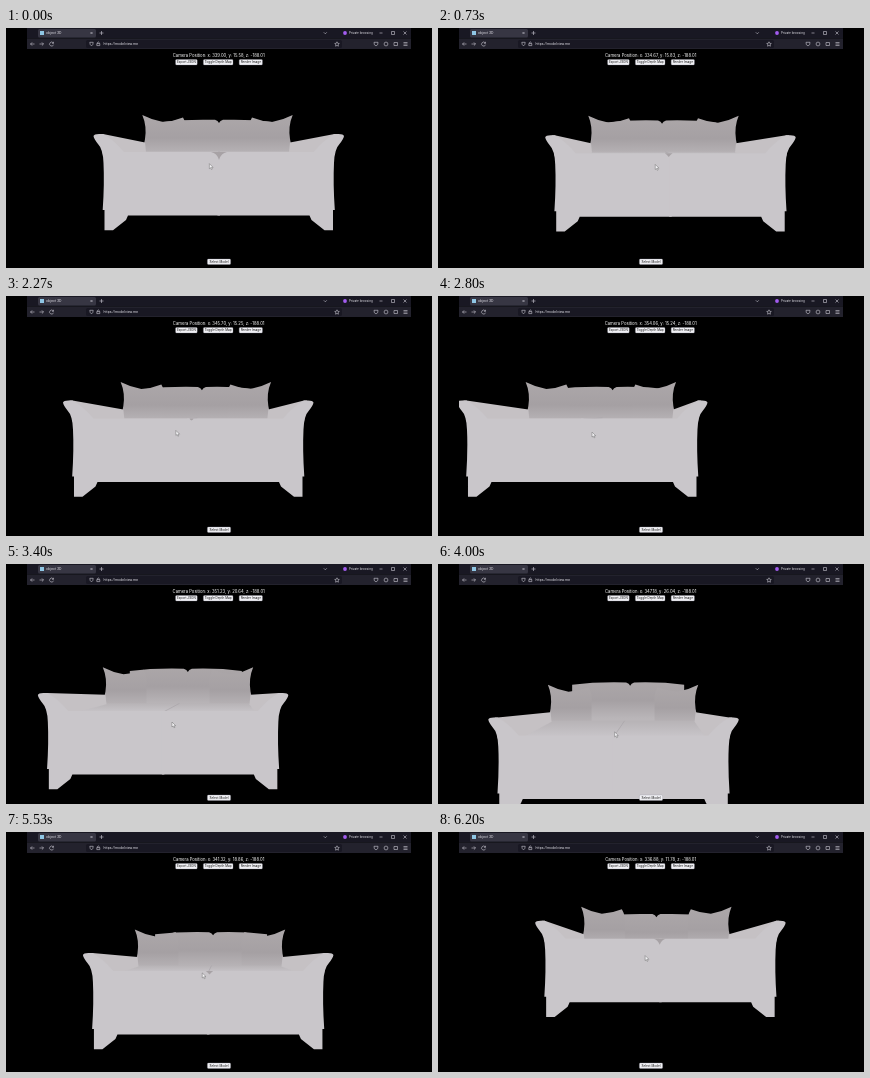
Recreate the animation shown at these times as an HTML page. Size 426 by 240 pixels, loop 6.27 s.

```html
<!DOCTYPE html>
<html lang="en">
<head>
<meta charset="utf-8">
<title>Sofa viewer</title>
<style>
  html, body { margin: 0; width: 100%; height: 100%; overflow: hidden; background: #000; }
  svg { display: block; width: 100%; height: 100%; }
  text { font-family: Inter, Roboto, sans-serif; }
  .icon { fill: none; stroke: #c9c8d2; stroke-width: .6; }
  .ui { fill: #e4e3ea; font-size: 3.4px; }
  .button rect { fill: #f0f0f4; stroke: #8f8f9d; stroke-width: .3; }
  .button text { fill: #111; font-size: 3.1px; text-anchor: middle; }
</style>
</head>
<body>
<svg viewBox="0 0 426 240">
  <defs>
    <clipPath id="page"><rect x="21" y="21" width="384" height="219"/></clipPath>
    <linearGradient id="cloth" gradientUnits="userSpaceOnUse" x1="0" y1="88" x2="0" y2="128">
      <stop offset="0" stop-color="#aca7a9"/>
      <stop offset=".55" stop-color="#a5a0a3"/>
      <stop offset="1" stop-color="#bab6b9"/>
    </linearGradient>
    <linearGradient id="seatTone" x1="0" y1="0" x2="0" y2="1">
      <stop offset="0" stop-color="#b7b3b6"/>
      <stop offset="1" stop-color="#c9c6ca"/>
    </linearGradient>
    <path id="pillow" d="M136.300 87Q146 92 157 94Q167 93.500 177 89.500Q181 96 180 106V127H139Q137 119 139 111Q141 98 136.300 87Z"/>
    <path id="half" d="M87.500 108Q88 106 93 106H97Q108 112 118 124H214V187.500H122L120 192L107 202.300H98.500V182H96.700Q98.500 155 97.500 135Q97 121 92 116Q88 111 87.500 108Z"/>
  </defs>
  <rect width="426" height="240"/>

  <g clip-path="url(#page)">
    <g id="rear">
      <path fill="url(#cloth)" d="M155 140V94Q180 91 209 91.800Q212 92.500 213 95Q214 92.500 217 91.800Q244 91 267 94V140Z"/>
      <path d="M213 95V124" stroke="#98939600" stroke-width=".6"/>
    </g>
    <g id="pillows" fill="url(#cloth)">
      <use href="#pillow"/>
      <use href="#pillow" transform="translate(423) scale(-1 1)"/>
    </g>
    <polygon id="seat" fill="url(#seatTone)"/>
    <polygon id="armL" fill="#c5c1c4"/>
    <polygon id="armR" fill="#c5c1c4"/>
    <path id="seam" stroke="#aaa5a9" stroke-width=".7"/>
    <g id="front" fill="#c9c6ca">
      <use href="#half"/>
      <use href="#half" transform="translate(425.500) scale(-1 1)"/>
      <path id="dip" fill="#a7a2a5"/>
    </g>
    <path id="pointer" d="M0 0V5L1.200 4L2 5.800L2.900 5.400L2.100 3.700H3.700Z" fill="#f4f4f6" stroke="#555" stroke-width=".4"/>
  </g>

  <rect x="21" width="384" height="10.500" fill="#191823"/>
  <rect x="21" y="10.500" width="384" height="10.500" fill="#23222d"/>
  <rect x="32" y="1" width="58" height="8.500" rx="1.500" fill="#373643"/>
  <rect x="34" y="3" width="4" height="4" fill="#8fc6e4"/>
  <text class="ui" x="40" y="6.300">object 3D</text>
  <rect x="80" y="12" width="256" height="8" rx="1.500" fill="#191823"/>
  <text class="ui" x="97.500" y="17.300">https://modelview.me</text>
  <circle cx="339" cy="5" r="1.900" fill="#a35cf0"/>
  <text class="ui" x="343" y="6.200" style="font-size:3px">Private browsing</text>
  <g class="icon">
    <path d="M84.500 4l2 2m0-2l-2 2M93.500 5h4M95.500 3v4M317.800 4.300l1.500 1.500l1.500-1.500"/>
    <path d="M373.500 5h3M385.500 3.500h3v3h-3zM397.500 3.500l3 3m0-3l-3 3"/>
    <path id="arrow" d="M28.500 16h-4l1.600-1.600M24.500 16l1.600 1.600"/>
    <use href="#arrow" transform="translate(62) scale(-1 1)"/>
    <path d="M47.300 15a2 2 0 1 0 .2 1.700M47.500 13.800v1.500h-1.500"/>
    <path d="M83.800 14.300h3.400q0 2.600-1.700 3.600q-1.700-1-1.700-3.600zM90.800 15.600h3v2h-3zM91.400 15.600v-1q.9-1.400 1.800 0v1"/>
    <path d="M331 13.800l.7 1.500l1.600 .2l-1.200 1.100l.3 1.600l-1.400-.8l-1.400 .8l.3-1.600l-1.200-1.100l1.600-.2z"/>
    <path d="M368 14.300h4q.3 3-2 3.600q-2.300-.6-2-3.600M388 14.500h3.500v3h-3.500zM397.500 14.500h4m-4 1.500h4m-4 1.500h4"/>
    <circle cx="380" cy="16" r="1.900"/>
  </g>

  <text id="readout" x="212.700" y="28.700" fill="#fff" font-size="4.190" text-anchor="middle"></text>
  <g id="buttons"></g>
</svg>
<script>
const LOOP = 6270, FPS = 15, END = 6200, SCALE = 4.55;
const FRONT = 1, MIDDLE = .71, REAR = .56;   // parallax by depth
const LEAD = 160;                            // the camera trails the pointer
const $ = id => document.getElementById(id);

// Where the drag turns or changes pace
const DRAG = [
  { t: 0, x: 339, y: 15.58 },
  { t: 1400, x: 331.72, y: 16 },
  { t: 2267, x: 345.71, y: 15.25 },
  { t: 2800, x: 354.06, y: 15.24 },
  { t: 4000, x: 347.18, y: 26.04 },
  { t: 4867, x: 344.43, y: 23.32 },
  { t: END, x: 336.88, y: 11.78 }
];

function buttonRow(labels, y) {
  const gap = 6.2, width = s => 4 + s.length * 1.6;
  let x = 213 - (labels.reduce((sum, s) => sum + width(s) + gap, -gap)) / 2;
  return labels.map(s => {
    const w = width(s), left = x;
    x += w + gap;
    return `<g class="button"><rect x="${left}" y="${y}" width="${w}" height="5.400" rx=".9"/>` +
      `<text x="${left + w / 2}" y="${y + 3.8}">${s}</text></g>`;
  }).join('');
}
$('buttons').innerHTML =
  buttonRow(['Export JSON', 'Toggle Depth Map', 'Render Image'], 31.5) +
  buttonRow(['Select Model'], 231);

const pace = (i, axis) => (DRAG[i + 1][axis] - DRAG[i][axis]) / (DRAG[i + 1].t - DRAG[i].t);

function slope(i, axis) {
  if (i === 0) return pace(0, axis);
  if (i === DRAG.length - 1) return pace(i - 1, axis);
  const a = pace(i - 1, axis), b = pace(i, axis);
  return a * b <= 0 ? 0 : 2 * a * b / (a + b);
}

// Monotone cubic through the drag points
function camera(t, axis) {
  let i = 0;
  while (i < DRAG.length - 2 && t >= DRAG[i + 1].t) i++;
  const a = DRAG[i], b = DRAG[i + 1], h = b.t - a.t;
  const u = Math.min(1, (t - a.t) / h), v = 1 - u;
  return a[axis] * (1 + 2 * u) * v * v + slope(i, axis) * h * u * v * v
    + b[axis] * u * u * (1 + 2 * v) - slope(i + 1, axis) * h * u * u * v;
}

// Screen offset of the front plane
const offset = t => [
  (339 - camera(t, 'x')) * SCALE,
  (camera(t, 'y') - 15.58) * SCALE
];

function draw(t) {
  const [dx, dy] = offset(t);
  const at = ([x, y, depth]) => `${x + depth * dx},${y + depth * dy}`;
  const mirror = ([x, y, depth]) => [(depth === FRONT ? 425.5 : 423) - x, y, depth];
  const polygon = (id, pts) => $(id).setAttribute('points', pts.map(at).join(' '));
  const shift = (id, depth) =>
    $(id).setAttribute('transform', `translate(${depth * dx} ${depth * dy})`);

  shift('rear', REAR);
  shift('pillows', MIDDLE);
  shift('front', FRONT);

  const edge = [[139, 123, MIDDLE], [116, 126, FRONT]];
  polygon('seat', [...edge, ...edge.map(mirror).reverse()]);
  const arm = [[94, 106, FRONT], [97, 106, FRONT], [139, 114.5, MIDDLE],
    [140, 124, MIDDLE], [120, 127, FRONT], [97, 127, FRONT]];
  polygon('armL', arm);
  polygon('armR', arm.map(mirror));
  $('seam').setAttribute('d', `M${at([213, 123, MIDDLE])}L${at([213, 125, FRONT])}`);

  const deep = Math.max(0, 8 - .2 * Math.abs(dx) - .15 * Math.max(0, dy));
  const mid = 213 - .1 * dx;
  $('dip').setAttribute('d',
    `M${mid - deep} 124Q${mid - 2} 125 ${mid} ${124 + deep}Q${mid + 2} 125 ${mid + deep} 124Z`);

  const [px, py] = offset(Math.min(END, t + LEAD)).map(d => d * .69);
  $('pointer').setAttribute('transform', `translate(${200.5 + px} ${135.5 + py})`);
  $('readout').textContent = 'Camera Position: ' +
    `x: ${camera(t, 'x').toFixed(2)}, y: ${camera(t, 'y').toFixed(2)}, z: -188.01`;
}

const start = performance.now();
function tick(now) {
  const t = Math.max(0, now - start) % LOOP;
  draw(Math.floor((t + 2) * FPS / 1000) * 1000 / FPS);
  requestAnimationFrame(tick);
}
draw(0);
requestAnimationFrame(tick);
</script>
</body>
</html>
```
